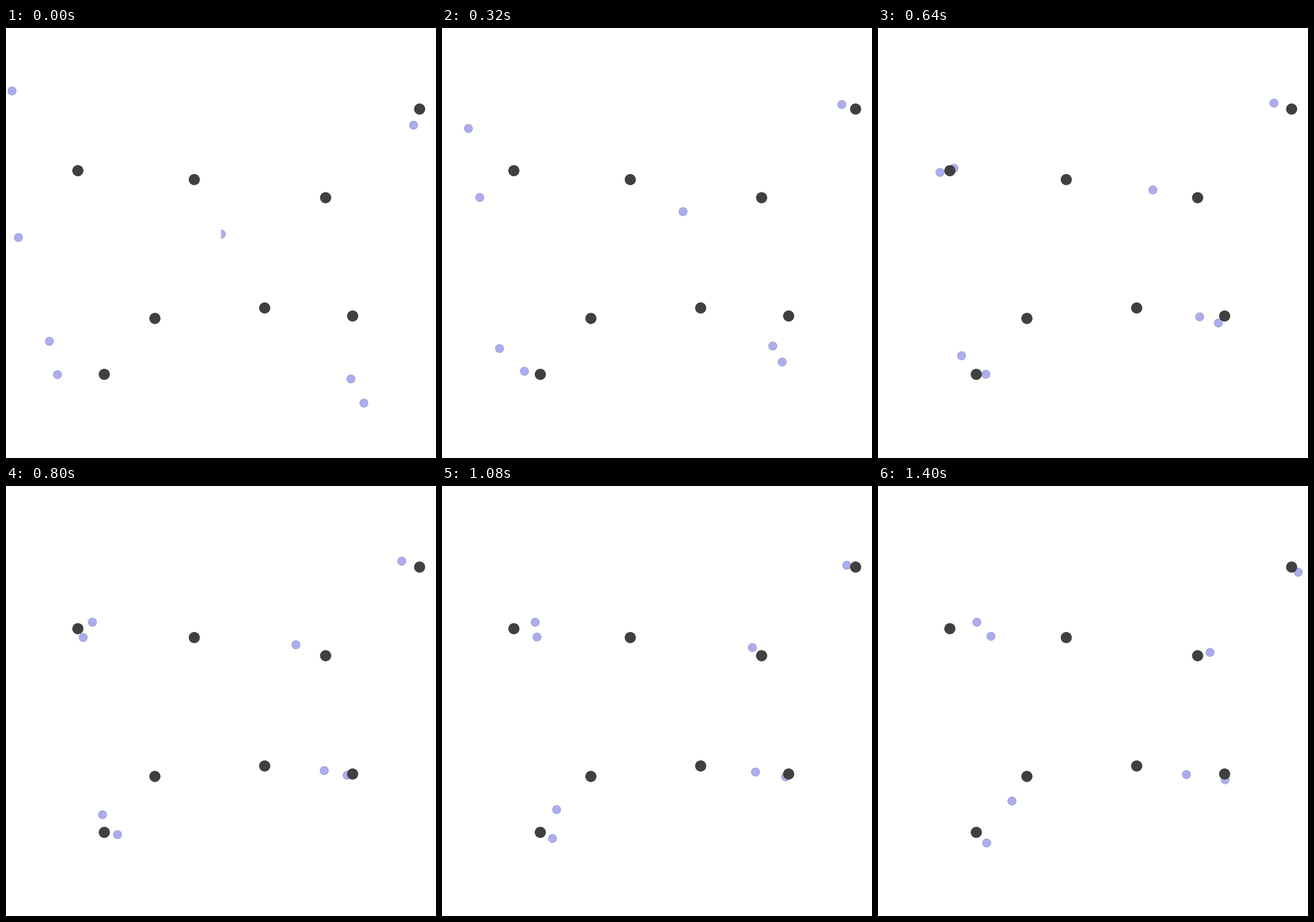
A matplotlib script that plays this animation: 748x748 px, repeating every 1.44 s.

```python
import numpy as np
import matplotlib.pyplot as plt
from matplotlib.animation import FuncAnimation
from matplotlib.patches import Circle, Rectangle

SIZE, DPI = 748, 100
FRAMES, INTERVAL = 36, 40
EDGE = 0.9 * 72 / DPI

OBSTACLES = [(125, 248.2), (327.5, 263.7), (556, 295.2), (719.5, 141),
             (259, 505.2), (450, 487), (603, 501), (171, 602.5)]

# Each dot: start, approach, turn past the obstacle, drift to the end
TIMES = np.array([0, 9, 19, 35])
PATHS = np.array([
    [(10.5, 109.5), (51.5, 183), (129, 263.5), (196.5, 261.5)],
    [(21.5, 364.5), (72, 288), (148, 237), (172, 237)],
    [(709, 169), (694.5, 132), (688, 130.5), (731, 150)],
    [(374.5, 358.5), (425.5, 315), (498.5, 276), (577.5, 289.5)],
    [(75.5, 545), (104, 559), (163, 572), (233, 548)],
    [(89.5, 603), (149, 597), (194, 605.5), (189, 621)],
    [(600, 610.5), (573, 547), (555, 495), (536.5, 502)],
    [(622.5, 652.5), (591, 573), (593, 503), (604, 511)],
])
CUT_DOT = 3  # this dot only shows right of the stage centre


def waypoint_velocities():
    """Harmonic mean of neighbouring speeds; zero where a dot turns back."""
    speed = np.diff(PATHS, axis=1) / np.diff(TIMES)[:, None]
    a, b = speed[:, :-1], speed[:, 1:]
    inner = 2 * np.maximum(a * b, 0) * np.sign(a) / (abs(a) + abs(b))
    return np.concatenate([speed[:, :1], inner, speed[:, -1:]], axis=1)


VELOCITIES = waypoint_velocities()


def positions(t):
    """Cubic Hermite motion of all dots at time t."""
    k = min(np.searchsorted(TIMES, t, side="right") - 1, len(TIMES) - 2)
    h = TIMES[k + 1] - TIMES[k]
    u = (t - TIMES[k]) / h
    blend = u * u * (3 - 2 * u)
    return ((1 - blend) * PATHS[:, k] + blend * PATHS[:, k + 1]
            + h * u * (1 - u) ** 2 * VELOCITIES[:, k]
            - h * u * u * (1 - u) * VELOCITIES[:, k + 1])


def add_dot(center, radius, fill, edge, layer):
    return ax.add_patch(Circle(center, radius, fc=fill, ec=edge, lw=EDGE, zorder=layer))


fig = plt.figure(figsize=(SIZE / DPI, SIZE / DPI), dpi=DPI, facecolor="white")
ax = fig.add_axes([0, 0, 1, 1])
ax.set(xlim=(0, SIZE), ylim=(SIZE, 0))
ax.axis("off")

for p in OBSTACLES:
    add_dot(p, 9.2, "#404040", "#383838", 2)
dots = [add_dot(p, 7.2, "#adadee", "#9898d0", 1) for p in PATHS[:, 0]]
right_half = Rectangle((SIZE / 2, 0), SIZE / 2, SIZE, transform=ax.transData)
dots[CUT_DOT].set_clip_path(right_half)


def update(frame):
    for dot, p in zip(dots, positions(frame)):
        dot.center = p
    return dots


anim = FuncAnimation(fig, update, frames=FRAMES, interval=INTERVAL, repeat=True)
plt.show()
```
